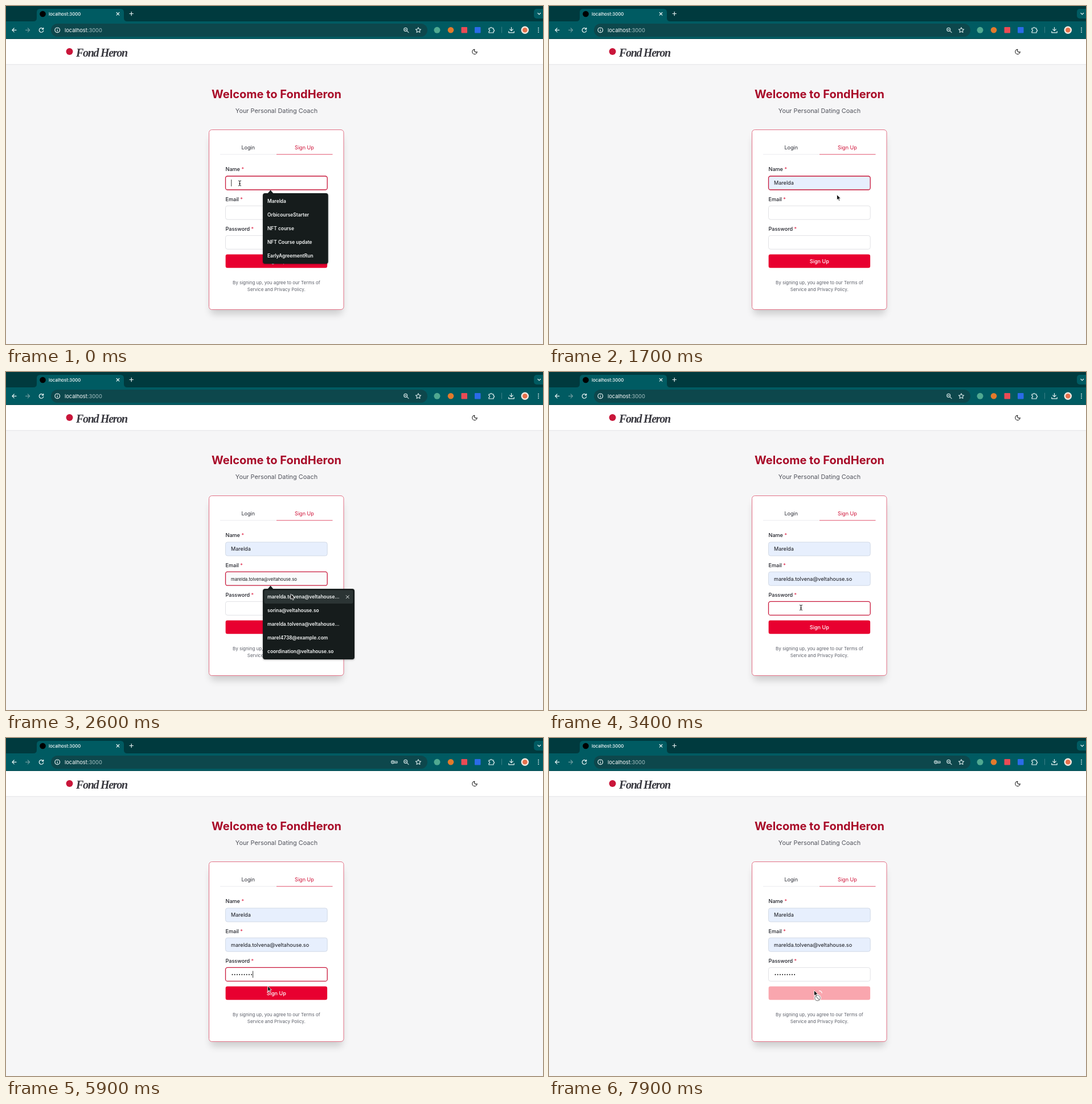
Recreate the animation shown at these times as an HTML page. Size 943x594 px, loop 8000 ms.

```html
<!DOCTYPE html>
<html lang="en">
<head>
<meta charset="utf-8">
<title>Sign up</title>
<style>
  html, body { margin: 0; width: 100%; height: 100%; overflow: hidden; background: #f6f6f7 }
  svg { display: block; width: 943px; height: 594px; font: 9.1px Inter, sans-serif }
  text { white-space: pre }
  .mid { text-anchor: middle }
  .line { fill: none; stroke-linecap: round; stroke-linejoin: round }
  .label { font-weight: 500; fill: #1f2028 }
  .req { fill: #e0284a; font-weight: 400 }
  .menu text { font-size: 8.4px; font-weight: 600; fill: #f4f6f6 }
</style>
</head>
<body>
<svg viewBox="0 0 943 594">
  <defs>
    <filter id="soft" x="-20%" y="-20%" width="140%" height="140%">
      <feGaussianBlur stdDeviation="6.6"/>
    </filter>
    <filter id="menuShadow" x="-20%" y="-20%" width="140%" height="150%">
      <feDropShadow dx="0" dy="1" stdDeviation="1.5" flood-opacity=".35"/>
    </filter>
    <path id="beamShape" d="M-2-4.5Q0-4.5 0-3Q0-4.5 2-4.5M0-3V3M-2 4.5Q0 4.5 0 3Q0 4.5 2 4.5M-1 .8H1"/>
  </defs>

  <!-- browser -->
  <rect width="943" height="28" fill="#003a3e"/>
  <path d="M0 27H48Q54 27 54 21V11Q54 5 60 5H201Q207 5 207 11V21Q207 27 213 27H943V58H0Z" fill="#005b62"/>
  <rect x="927" y="5" width="24" height="17" rx="5" fill="#005b62"/>
  <rect x="79" y="31" width="661" height="23" rx="11.5" fill="#0d474c"/>
  <circle cx="64.5" cy="14" r="5.3"/>
  <text x="75" y="16.7" font-size="7.8" font-weight="500" fill="#fff">localhost:3000</text>
  <text x="103" y="45.6" font-size="9.3" fill="#fff">localhost<tspan fill="#a9c3c5">:3000</tspan></text>
  <g class="line" stroke="#eaf5f5" stroke-width="1.2">
    <path d="M194.2 11.5l4.6 4.6m0-4.6l-4.6 4.6M217 13.5h6.4m-3.2-3.2v6.4M934 12.5l2.3 2.3 2.3-2.3"/>
    <path d="M18 42.3H11m3.2-3.3l-3.3 3.3 3.3 3.3"/>
    <path d="M34.5 42.3h7m-3.2-3.3l3.3 3.3-3.3 3.3" stroke="#6f9da0"/>
    <path d="M65.3 40.5A3.8 3.8 0 1 0 65.7 43.4M65.7 38.3v2.5h-2.5"/>
    <circle cx="90.2" cy="42.3" r="4.3"/><path d="M90.2 42v2.3m0-4.4v.1"/>
    <g stroke="#c4d8d9">
      <circle cx="701.7" cy="41.3" r="3"/><path d="M704 43.6l3 3m-6.6-5.3h2.6"/>
      <path d="M724 37.7l1.4 2.9 3.2.4-2.3 2.2.6 3.2-2.9-1.6-2.9 1.6.6-3.2-2.3-2.2 3.2-.4z"/>
      <g id="key"><circle cx="679" cy="42.3" r="2.5"/><path d="M681.5 41h5.5v2.8h-5.5m2.5 0v-1.2"/><circle cx="679" cy="42.3" r=".4"/></g>
    </g>
    <path d="M848 39h2.4a1.5 1.5 0 0 1 3 0h2.6v2.7a1.5 1.5 0 0 1 0 3v2.3h-8v-2.5a1.5 1.5 0 0 0 0-3z"/>
    <path d="M870.5 37v10" stroke="#4c8b90" stroke-width=".8"/>
    <path d="M887.5 37.5v6m-2.8-2.6l2.8 2.8 2.8-2.8M882.8 44.5v2.3h9.4v-2.3"/>
    <path d="M935 38.7v.1m0 3.4v.1m0 3.4v.1" stroke-width="1.9"/>
  </g>
  <circle cx="757" cy="42.3" r="5.5" fill="#4fa991"/>
  <circle cx="781" cy="42.3" r="5.3" fill="#e27a2c"/>
  <rect x="799.5" y="37" width="10.5" height="10.5" rx="1" fill="#ea4b55"/>
  <rect x="823" y="37" width="10.5" height="10.5" rx="1" fill="#2b6be8"/>
  <circle cx="911.3" cy="42.3" r="6.7" fill="#f6e9e1"/><circle cx="911.3" cy="42.3" r="4.3" fill="#e5714c"/>

  <!-- page header -->
  <rect y="57.5" width="943" height="45" fill="#fff"/>
  <path d="M0 57.5H943" stroke="#00474c"/>
  <path d="M0 102.8H943" stroke="#e3e3e6"/>
  <circle cx="111.5" cy="80" r="6" fill="#c9163a"/>
  <text x="123" y="88.5" font-family="'Liberation Serif', serif" font-size="20" font-weight="700" font-style="italic" letter-spacing="-1.3" fill="#38383f">Fond Heron</text>
  <path d="M823 76.2a3 3 0 0 0 4.2 4.2 4.2 4.2 0 1 1-4.2-4.2z" class="line" stroke="#222" stroke-width="1.1"/>

  <text class="mid" x="475" y="162.4" font-size="20" font-weight="700" fill="#a80b28">Welcome to FondHeron</text>
  <text class="mid" x="475" y="188.2" font-size="10.9" fill="#51535c">Your Personal Dating Coach</text>

  <!-- card -->
  <rect x="359.2" y="231" width="231" height="310.5" rx="5" opacity=".17" filter="url(#soft)"/>
  <rect x="356.5" y="217.5" width="236.5" height="316" rx="5" fill="#fff" stroke="#e27085"/>
  <text class="mid" x="425.3" y="252.4" fill="#2d2f38">Login</text>
  <text class="mid" x="524" y="252.4" fill="#cf1238">Sign Up</text>
  <path d="M376 260.8H475" stroke="#e9e9ec" stroke-width=".9"/>
  <path d="M475 260.8H573.5" stroke="#e2506c"/>
  <g id="fields"></g>
  <path id="dots" class="line" stroke="#111" stroke-width="2" stroke-dasharray="0 4.2"/>
  <path id="caret" stroke="#222" stroke-width=".9"/>
  <rect id="button" x="385.6" y="436.5" width="178.5" height="23.8" rx="3.2"/>
  <text id="buttonText" class="mid" x="474.8" y="451.9" font-weight="500" fill="#fff">Sign Up</text>
  <path id="spinner" class="line" d="M-4.2 0A4.2 4.2 0 0 1 0-4.2" stroke="#fff" stroke-width="1.3"/>
  <g class="mid" font-size="8" fill="#5d606a">
    <text x="474.8" y="488.7">By signing up, you agree to our Terms of</text>
    <text x="474.8" y="501.3">Service and Privacy Policy.</text>
  </g>
  <g id="menus"></g>

  <!-- pointers -->
  <g id="pointer">
    <g id="beam" class="line">
      <use href="#beamShape" stroke="#fff" stroke-width="2"/>
      <use href="#beamShape" stroke="#111"/>
    </g>
    <g id="arrow">
      <g id="blocked" class="line" stroke="#8c8c8c" stroke-width="1.3">
        <circle cx="6" cy="13.5" r="6.3" fill="#fff" stroke="none"/>
        <circle cx="6" cy="13.5" r="4.7"/>
        <path d="M2.9 10.3L9.2 16.7"/>
      </g>
      <path d="M0 0V9.5L2.2 7.5 3.7 10.9 5.3 10.2 3.8 6.9H6.8Z" fill="#111" stroke="#fff" stroke-width=".8"/>
    </g>
  </g>
</svg>
<script>
const $ = id => document.getElementById(id);
const show = (el, on) => el.style.display = on ? '' : 'none';
const set = (el, attrs) => { for (const k in attrs) el.setAttribute(k, attrs[k]); };

const LOOP = 8000;
const NAME = 'Marelda', EMAIL = 'marelda.tolvena@veltahouse.so';
const SHORT = 'marelda.tolvena@veltahouse...';
const FIELD_TOPS = [299, 351.2, 403.4];
const KEYS = [4300, 4400, 4500, 4800, 5000, 5100, 5300, 5400, 5600];
const SENT = 6200;
// time, x, y
const PATH = [
  [0, 410.5, 311.5], [700, 410.5, 311.5], [1200, 505.5, 331.5], [1700, 505.5, 331.5],
  [1900, 457, 361.5], [2200, 457, 361.5], [2500, 500, 390], [2800, 500, 390],
  [3100, 442.5, 414], [5500, 442.5, 414], [6100, 465.5, 443.5], [LOOP, 465.5, 443.5]
];

$('fields').innerHTML = ['Name', 'Email', 'Password'].map((label, i) => {
  const top = FIELD_TOPS[i];
  return `<text class="label" x="385.5" y="${top - 8.6}">${label} <tspan class="req">*</tspan></text>
    <rect x="385.5" y="${top}" width="178.7" height="24" rx="3.5"/>
    <text x="395" y="${top + 15.3}" fill="#14151a"></text>`;
}).join('');
const boxes = [...$('fields').querySelectorAll('rect')];
const values = boxes.map(box => box.nextElementSibling);

function addMenu(top, width, height, rows) {
  const g = document.createElementNS('http://www.w3.org/2000/svg', 'g');
  g.setAttribute('class', 'menu');
  g.innerHTML = `<path d="M459 ${top + 1}L464.5 ${top - 5.5}L470 ${top + 1}Z" fill="#151d1d"/>
    <rect x="451" y="${top}" width="${width}" height="${height}" rx="4" fill="#151d1d" filter="url(#menuShadow)"/>
    <g class="hover"><rect x="453.5" y="${top + 2.5}" width="${width - 5}" height="23.5" rx="3" fill="#2b3434"/>
    <path d="M${width + 436} ${top + 11.5}l5.6 5.6m0-5.6l-5.6 5.6" stroke="#e4e8e8"/></g>
    ${rows.map((row, i) => `<text x="459" y="${top + 17.4 + i * 23.8}">${row}</text>`).join('')}`;
  return $('menus').appendChild(g);
}
const nameMenu = addMenu(329, 114.7, 124, [NAME, 'OrbicourseStarter', 'NFT course', 'NFT Course update', 'EarlyAgreementRun']);
const matchMenu = addMenu(329, 102.5, 28.5, [NAME]);
const emailMenu = addMenu(381, 161, 124, [SHORT, 'sorina@veltahouse.so', SHORT, 'marel4738@example.com', 'coordination@veltahouse.so']);

function pointerAt(t) {
  const i = PATH.findIndex(p => p[0] > t);
  const [t0, x0, y0] = PATH[i - 1], [t1, x1, y1] = PATH[i];
  const u = (t - t0) / (t1 - t0), e = u * u * (3 - 2 * u);
  return [x0 + (x1 - x0) * e, y0 + (y1 - y0) * e];
}

function draw(t) {
  const within = (a, b) => t >= a && t < b;
  const focus = t < 1900 ? 0 : t < 3000 ? 1 : t < SENT ? 2 : -1;
  const previews = [within(1000, 1300), within(2400, 2900), false];
  const filled = [t >= 1300, t >= 2900, false];
  const typed = t < 200 ? 0 : t < 400 ? 1 : t < 600 ? 2 : 3;

  values[0].textContent = t >= 1000 ? NAME : NAME.slice(0, typed);
  values[1].textContent = t >= 2400 ? EMAIL : '';
  boxes.forEach((box, i) => {
    set(values[i], { 'font-size': previews[i] ? 7.7 : 9.1 });
    set(box, {
      fill: filled[i] ? '#e7effd' : previews[i] ? '#fafbfc' : '#fff',
      stroke: focus == i ? '#c8173a' : filled[i] ? '#cfd6e4' : '#dedfe3',
      'stroke-width': focus == i ? 1.3 : .9
    });
  });

  const count = KEYS.filter(k => k <= t).length;
  set($('dots'), { d: count ? `M397.5 415.8h${4.2 * (count - 1) + .01}` : '' });

  const caretOn = t < 1000 || within(1900, 2400) || within(3000, 3400) || within(3800, 4100) || within(4300, SENT);
  show($('caret'), caretOn);
  if (caretOn) {
    const offset = focus == 2 ? 4.2 * count : focus == 0 && typed ? values[0].getComputedTextLength() : 0;
    set($('caret'), { d: `M${395.8 + offset} ${FIELD_TOPS[focus] + 6}v12` });
  }

  show(nameMenu, t < 200);
  show(matchMenu, within(200, 1300));
  show(emailMenu, within(1900, 2900));
  show(nameMenu.querySelector('.hover'), false);
  show(matchMenu.querySelector('.hover'), previews[0]);
  show(emailMenu.querySelector('.hover'), previews[1]);

  const sent = t >= SENT;
  show($('key'), t >= 4300);
  show($('buttonText'), !sent);
  show($('spinner'), sent);
  set($('button'), { fill: sent ? '#f9a6ae' : '#e80030' });
  set($('spinner'), { transform: `translate(475 448.5) rotate(${(t - 6600) * .36 - 25})` });

  const [x, y] = pointerAt(t);
  const overField = FIELD_TOPS.some(top => y > top && y < top + 24);
  const onMenu = previews[0] || previews[1];
  show($('pointer'), !within(200, 800) && !within(4300, 5600));
  show($('beam'), overField && !onMenu);
  show($('arrow'), !overField || onMenu);
  show($('blocked'), sent);
  set($('pointer'), { transform: `translate(${x} ${y})` });
}

function tick() {
  draw(Math.floor(performance.now() % LOOP / 100) * 100);
  requestAnimationFrame(tick);
}
tick();
</script>
</body>
</html>
```
